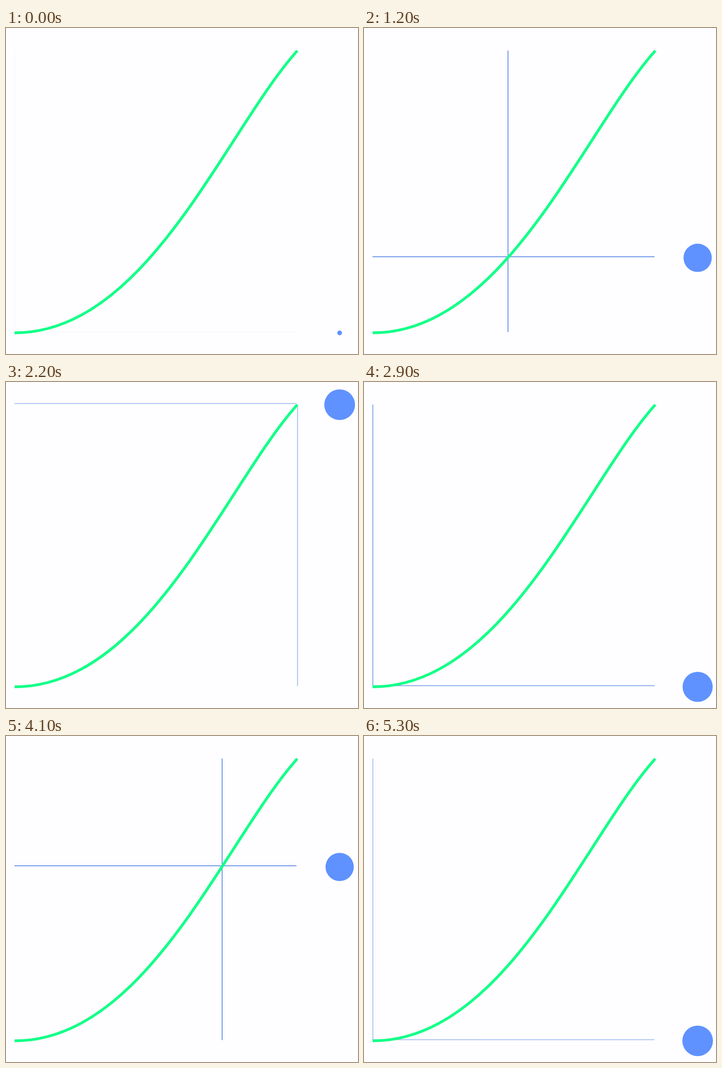
These frames come from a looping animation (777x721 px, 5.4 s). An HTML page:

```html
<!DOCTYPE html>
<html lang="en">
<head>
<meta charset="utf-8">
<title>Ease-in curve</title>
<style>
  html, body { margin: 0; width: 100%; height: 100%; overflow: hidden; background: #fefdff; }
  svg { display: block; }
</style>
</head>
<body>
<svg width="777" height="721" viewBox="0 0 777 721" fill="none">
  <g id="lines" stroke="#5788e2" stroke-width="1.8">
    <path id="vertical" d="M19.5 50V672.5"/>
    <path id="horizontal" d="M18.7 671.7H641.2"/>
  </g>
  <path id="curve" stroke="#14ff88" stroke-width="6.2"/>
  <circle id="ball" cx="736.5" fill="#5f92ff"/>
</svg>
<script>
const LEFT = 19, BOTTOM = 674.2, SIZE = 624, RADIUS = 31.2;
const GROW = 500, MOVE = 1500, SHRINK = 500, CYCLE = 2517;
const LOOP = 5400, STEP = 100, LEAD = 17;

const $ = id => document.getElementById(id);
const lines = $('lines'), vertical = $('vertical'), horizontal = $('horizontal'), ball = $('ball');

// Same meaning as CSS cubic-bezier(); solved by bisection.
function bezier(x1, y1, x2, y2) {
  const at = (a, b, s) => 3 * s * (1 - s) ** 2 * a + 3 * s * s * (1 - s) * b + s ** 3;
  return x => {
    if (x <= 0 || x >= 1) return x <= 0 ? 0 : 1;
    let low = 0, high = 1;
    for (let i = 0; i < 30; i++) {
      const mid = (low + high) / 2;
      if (at(x1, x2, mid) < x) low = mid; else high = mid;
    }
    return at(y1, y2, low);
  };
}

const sineIn = [0.47, 0, 0.745, 0.715];
const travel = bezier(...sineIn);
const backOut = bezier(0.175, 0.885, 0.32, 1.275);
const backIn = bezier(0.6, -0.28, 0.735, 0.045);
const clamp = v => Math.min(1, Math.max(0, v));

const point = (x, y) => `${LEFT + SIZE * x} ${BOTTOM - SIZE * y}`;
const [x1, y1, x2, y2] = sineIn;
$('curve').setAttribute('d', `M${point(0, 0)}C${point(x1, y1)} ${point(x2, y2)} ${point(1, 1)}`);

function draw(time) {
  const t = (time + LEAD) % CYCLE;
  const enter = clamp(t / GROW);
  const x = clamp((t - GROW) / MOVE);
  const leave = clamp((t - GROW - MOVE) / SHRINK);
  const rise = SIZE * travel(x);

  lines.setAttribute('opacity', enter * (1 - leave));
  vertical.setAttribute('transform', `translate(${SIZE * x} 0)`);
  horizontal.setAttribute('transform', `translate(0 ${-rise})`);
  ball.setAttribute('cy', BOTTOM - rise);
  ball.setAttribute('r', Math.max(0, RADIUS * backOut(enter) * (1 - backIn(leave))));
}

// The picture advances ten times a second.
function tick() {
  const now = (performance.now() + 1) % LOOP;
  draw(Math.floor(now / STEP) * STEP);
  requestAnimationFrame(tick);
}
tick();
</script>
</body>
</html>
```
